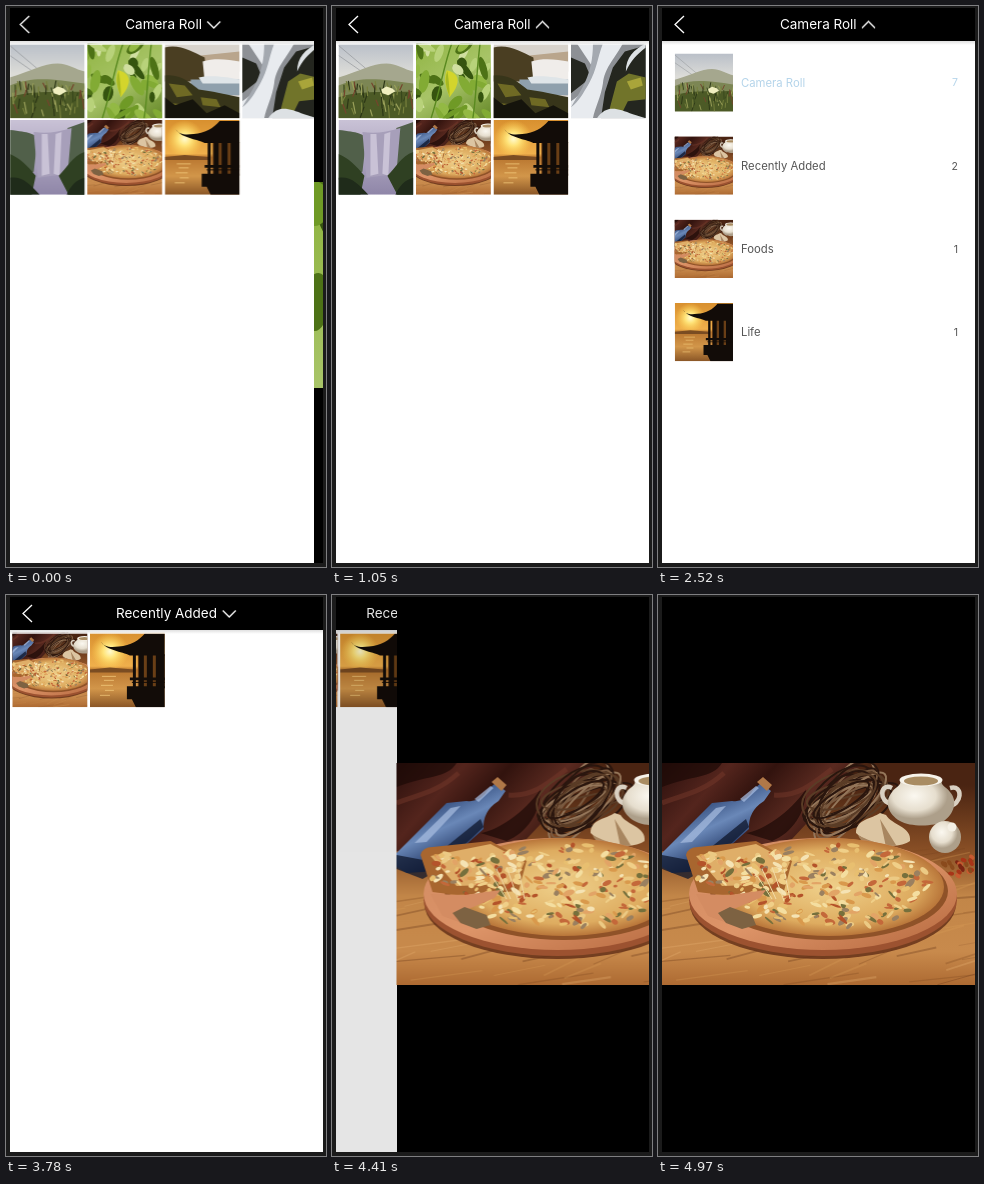
Write an HTML page that moves like this. It is 320 px wide and 561 px high and loops after 5.04 s.

```html
<!DOCTYPE html>
<html lang="en">
<head>
<meta charset="utf-8">
<title>Photo picker</title>
<style>
html, body { margin: 0; width: 100%; height: 100%; overflow: hidden; background: #1b1b1b; }
svg { display: block; }
text { font-family: Inter, Roboto, sans-serif; }
.title { font-size: 13.5px; fill: #fff; text-anchor: middle; }
.row { font-size: 11.3px; fill: #555; }
.count { font-size: 10.5px; text-anchor: end; }
.on { fill: #b4d4ea; }
.line { fill: none; stroke: #fff; stroke-width: 1.3; }

#page, #detail, #dim, #list, #arrow, #shift, #fresh, .early, .late { animation: 5040ms ease-in-out infinite; }
#page { animation-name: page; }
#detail { animation-name: detail; }
#dim { animation-name: dim; }
#list { animation-name: list; }
#fresh { animation-name: fresh; }
#arrow { animation-name: arrow; transform-box: fill-box; transform-origin: center; }
#shift { animation-name: shift; animation-timing-function: step-end; }
.early { animation-name: early; animation-timing-function: step-end; }
.late { opacity: 0; animation-name: late; animation-timing-function: step-end; }

@keyframes page {
  0% { transform: translateX(-2.7px); }
  1.38%, 78.94% { transform: translateX(0); }
  91.25%, 100% { transform: translateX(-94px); }
}
@keyframes detail {
  0% { transform: translateX(304px); }
  1.38%, 78.94% { transform: translateX(313px); }
  91.25%, 100% { transform: translateX(0); }
}
@keyframes dim {
  0%, 78.94% { opacity: 0; }
  91.25%, 100% { opacity: .13; }
}
@keyframes list {
  0%, 21.6% { transform: translateY(-522px); }
  29.8%, 52.2% { transform: translateY(0); }
  57%, 100% { transform: translateY(-522px); }
}
@keyframes arrow {
  0%, 17.2% { transform: rotate(0); }
  20.7%, 52.2% { transform: rotate(180deg); }
  57%, 100% { transform: rotate(360deg); }
}
@keyframes fresh {
  0%, 61.9% { opacity: 0; }
  67.5%, 100% { opacity: 1; }
}
@keyframes shift { 0% { transform: none; } 52.5%, 100% { transform: translateX(12.7px); } }
@keyframes early { 0% { opacity: 1; } 52.5%, 100% { opacity: 0; } }
@keyframes late { 0% { opacity: 0; } 52.5%, 100% { opacity: 1; } }
</style>
</head>
<body>
<svg width="100%" height="100%" viewBox="0 0 320 561">
  <defs>
    <linearGradient id="wood" x2="0" y2="1">
      <stop offset=".1" stop-color="#4a2412"/><stop offset=".4" stop-color="#8a5026"/>
      <stop offset=".6" stop-color="#c28648"/><stop offset=".85" stop-color="#c88a4c"/><stop offset="1" stop-color="#ad6a32"/>
    </linearGradient>
    <linearGradient id="cloth" x2="1" y2=".4">
      <stop offset="0" stop-color="#2a0f0c"/><stop offset=".3" stop-color="#54251d"/><stop offset=".5" stop-color="#32130e"/>
      <stop offset=".75" stop-color="#5a2a20"/><stop offset="1" stop-color="#2c110c"/>
    </linearGradient>
    <linearGradient id="glass" x1=".3" y1=".2" x2=".7" y2=".9">
      <stop offset="0" stop-color="#2a4272"/><stop offset=".4" stop-color="#6a88b8"/><stop offset=".75" stop-color="#2c4270"/><stop offset="1" stop-color="#121a30"/>
    </linearGradient>
    <linearGradient id="clay" x2="1" y2="1">
      <stop offset="0" stop-color="#d08a62"/><stop offset=".5" stop-color="#dd9468"/><stop offset="1" stop-color="#b5683e"/>
    </linearGradient>
    <radialGradient id="cheese">
      <stop offset="0" stop-color="#efd08a"/><stop offset=".75" stop-color="#deac60"/><stop offset="1" stop-color="#b9763a"/>
    </radialGradient>
    <radialGradient id="china" cx=".4" cy=".35">
      <stop offset="0" stop-color="#fbf8f0"/><stop offset=".65" stop-color="#e6dece"/><stop offset="1" stop-color="#ad9f8a"/>
    </radialGradient>
    <linearGradient id="dusk" x2="0" y2="1">
      <stop offset="0" stop-color="#d8902f"/><stop offset=".45" stop-color="#f0b04c"/>
      <stop offset=".5" stop-color="#b9762f"/><stop offset=".75" stop-color="#d2964a"/><stop offset="1" stop-color="#8a5626"/>
    </linearGradient>
    <radialGradient id="sun"><stop offset="0" stop-color="#fffbd0"/><stop offset=".35" stop-color="#ffe47a"/><stop offset="1" stop-color="#ffd050" stop-opacity="0"/></radialGradient>
    <linearGradient id="haze" x2="0" y2="1"><stop offset="0" stop-color="#b9bfc8"/><stop offset=".4" stop-color="#dcdcd8"/></linearGradient>
    <linearGradient id="mist" x2="0" y2="1"><stop offset="0" stop-color="#c9c2d6"/><stop offset="1" stop-color="#8f86a8"/></linearGradient>
    <linearGradient id="leafy" x2="1" y2="1"><stop offset="0" stop-color="#8cb23c"/><stop offset=".5" stop-color="#a8c468"/><stop offset="1" stop-color="#587c1c"/></linearGradient>
    <linearGradient id="edge" x2="0" y2="1"><stop offset="0" stop-color="#d2d2d2"/><stop offset="1" stop-color="#fff"/></linearGradient>

    <symbol id="pizza" viewBox="0 0 313 222" preserveAspectRatio="xMidYMid slice">
      <path fill="url(#wood)" d="M0 0h313v222H0z"/>
      <g id="grain" fill="none" stroke-opacity=".3"/>
      <path fill="url(#cloth)" d="M0 0h200l-25 28-45 48-60 14L0 88z"/>
      <path fill="#1c0907" opacity=".7" d="M0 0h60C50 16 30 12 0 24zM84 70c16-2 44-20 60-44 0 24-14 44-34 52z"/>
      <path fill="none" stroke="#74382b" stroke-opacity=".5" stroke-width="5" d="M0 40c20-8 40-10 62-30M112 32c24 2 40-12 58-26"/>
      <g id="twigs" fill="none" stroke-width="2"/>
      <path fill="url(#glass)" d="M0 90 50 40l20-2q14 2 22-12l7-6 10 8-7 10q-16 10-15 28l-47 42-30 2-10-6z"/>
      <path fill="#0f172c" opacity=".75" d="M0 92l32 6 52-42 3 8-47 44-14 8-26-10z"/>
      <path fill="#a4bade" opacity=".75" d="M18 80 54 45l10-2-34 36zM78 36l16-13 3 2-15 14z"/>
      <path fill="#b07848" d="M95 19l6-5 9 8-5 6z"/>
      <path fill="none" stroke="#d9d0c2" stroke-width="4.500" d="M230 25c-12-6-14 14 0 16M288 25c14-4 12 18-2 18"/>
      <path fill="url(#china)" d="M238 17c2 6-4 6-8 12-8 10-4 22 8 29 10 6 34 6 44 0 10-7 14-20 6-29-4-6-10-6-8-12z"/>
      <ellipse cx="259" cy="17" rx="21.500" ry="6.500" fill="#f7f3ea"/>
      <ellipse cx="259" cy="18" rx="17" ry="4.500" fill="#a98c62"/>
      <path fill="#dcc5a2" d="M194 70c0-14 16-14 24-20l6 2c6 10 26 12 24 26-10 8-40 6-54-8z"/>
      <path fill="#a88660" d="M218 56l6 28 10-2zM196 72c16 8 20 8 30 10-14 2-26 0-30-10z"/>
      <circle cx="283" cy="74" r="16" fill="url(#china)"/>
      <circle cx="290" cy="64" r="4.500" fill="#f4efe4"/>
      <g id="spice"/>
      <ellipse cx="161" cy="141" rx="133" ry="55" fill="#5f2c16" opacity=".8"/>
      <ellipse cx="161" cy="137" rx="134" ry="56" fill="#9c5230"/>
      <ellipse cx="161" cy="131" rx="134" ry="56" fill="url(#clay)"/>
      <ellipse cx="167" cy="128" rx="119" ry="49" fill="#8f5228"/>
      <ellipse cx="167" cy="124" rx="115" ry="49" fill="url(#cheese)"/>
      <path fill="#a8662f" d="M24 92q2-8 12-8l58-6 36 20-8 30-62 4-24-3z"/>
      <path fill="#dfae68" d="M34 93l60-12 34 18-10 22-58 2z"/>
      <g id="toppings"/>
      <path fill="#d48c62" d="M34 131l34 1 36-5-6 8-38 16 8 10-22-8z"/>
      <path fill="#7d6242" d="M56 150l12-6 22 8 4 10-14 4-16-6z"/>
      <path stroke="#f3dca8" fill="none" d="M92 108l18 28M100 106l14 30M110 104l12 34M122 106l6 30"/>
    </symbol>

    <symbol id="leaves" viewBox="0 0 313 206" preserveAspectRatio="xMidYMid slice">
      <path fill="url(#leafy)" d="M0 0h313v206H0z"/>
      <g id="foliage"/>
      <path fill="none" stroke="#5a8a20" stroke-width="4" d="M95 206C120 130 130 60 152 0M210 206c10-60 8-110 20-206"/>
      <path fill="#d3d52c" d="M138 74c24 4 36 22 28 40-4 14-12 22-20 34-8-24-18-46-8-74z"/>
      <path fill="#a5b822" d="M140 76c4 24 6 50 6 70-8-20-16-44-6-70z"/>
    </symbol>

    <symbol id="meadow" viewBox="0 0 75 75">
      <path fill="url(#haze)" d="M0 0h75v75H0z"/>
      <path stroke="#8a8e92" stroke-width=".6" d="M0 2 38 34M0 12l26 18"/>
      <path fill="#a5a78e" d="M0 34c20-6 34-14 48-14 10 0 18 6 27 8v47H0z"/>
      <path fill="#7c8654" d="M0 42c24-10 44-6 75-2v35H0z"/>
      <path fill="#4c5a26" d="M0 54c24-8 50-4 75-6v27H0z"/>
      <g id="grass" stroke-width="1.200" fill="none"/>
      <path fill="#f0efc0" d="M43 46l5-3 6 2 3 3-7 4-6-2z"/>
    </symbol>

    <symbol id="cliff" viewBox="0 0 75 75">
      <path fill="#d8d3cc" d="M0 0h75v75H0z"/>
      <path fill="#b9a58c" d="M36 12 75 8v20H36z"/>
      <path fill="#4a3e22" d="M0 4c14-4 28 4 40 10l2 24H0z"/>
      <path fill="#f0edea" d="M38 18c12-4 26-2 37 0v20H40z"/>
      <path fill="#8fa0ac" d="M26 36h49v16H26z"/>
      <path fill="#dfe5e8" d="M34 34c12-3 30 0 41 2v4L38 40z"/>
      <path fill="#37351a" d="M0 32c16-2 26 8 34 14 14 2 24 4 41 8v21H0z"/>
      <path fill="#6f6a24" d="M4 40l16 2 8 10-16 2zM36 54l16 2 4 8-18-2zM8 60l18 2-4 8z"/>
      <path fill="#15140c" d="M0 54l10 8 18-6 14 14 18-8 15 8v5H0z"/>
    </symbol>

    <symbol id="rapids" viewBox="0 0 75 75">
      <path fill="#8d9095" d="M0 0h75v75H0z"/>
      <path fill="#24261f" d="M42 24 54 8l21-6v73H30l4-26zM0 14l14 6 6 14-20 16z"/>
      <path fill="#71742a" d="M46 38l12-8 17 4v22l-18 2-6 12-14 2z"/>
      <path fill="#a9a53a" d="M56 38l14-4 2 8-12 4z"/>
      <path fill="#e8ebef" d="M6 0h46c-10 18-18 24-20 40-2 14-8 24-10 35H0V58c12-8 20-20 22-34z"/>
      <path fill="#a4a9b0" d="M22 0h10c-6 16-6 26-14 40-6 10-10 18-18 24 10-18 22-32 22-64z"/>
      <path fill="#dde1e4" d="M75 4c-10 8-14 12-20 24 0-14 8-22 20-28zM26 75c10-14 20-10 36-4l13 4z"/>
    </symbol>

    <symbol id="falls" viewBox="0 0 75 75">
      <path fill="url(#mist)" d="M0 0h75v75H0z"/>
      <path fill="#51604a" d="M0 10c20 2 24 4 28 8l-4 34L0 60zM58 8l17-6v73H58z"/>
      <path fill="#a79fba" d="M24 12c14 2 24 0 38-4l-4 46-30 4z"/>
      <path fill="#c9c2d6" d="M32 14l6 0 2 40-8 2zM46 14l6-2-2 44-6-2z"/>
      <path fill="#2f4022" d="M0 34c10 4 18 12 26 22l-4 19H0zM75 32c-12 4-18 16-26 24l10 19h16z"/>
      <path fill="#1f2b1a" d="M0 58c12-2 20 6 30 17H0zM75 58c-8 2-14 8-18 17h18z"/>
    </symbol>

    <symbol id="pavilion" viewBox="0 0 75 75">
      <path fill="url(#dusk)" d="M0 0h75v75H0z"/>
      <circle cx="20" cy="19" r="19" fill="url(#sun)"/>
      <path fill="#7a4c22" d="M0 37l20-2 24 2v3H0z"/>
      <path stroke="#f6cf80" stroke-opacity=".7" d="M12 44h14M14 48h10M11 53h12M15 58h9M10 63h10"/>
      <path fill="#6a3f16" d="M48 22h27v34H48z"/>
      <g fill="#120c08">
        <path d="M11 9c3 6 10 6 18 5 12-1 20-6 26-13h20v22H40c-8-4-24-5-29-14z"/>
        <path d="M43 22h3v34h-3zM49 22h5v34h-5zM57 22h6v34h-6zM66 22h9v34h-9z"/>
        <path d="M40 45h35v3H40zM37 54h38v21H46l-4-8h-5z"/>
      </g>
      <path stroke="#120c08" d="M42 50h33"/>
    </symbol>
  </defs>

  <path fill="#1b1b1b" d="M0 0h320v561H0z"/>
  <svg x="4" y="2" width="313" height="555" viewBox="4 2 313 555">
    <path d="M4 2h313v555H4z"/>
    <g id="page">
      <path fill="#fff" d="M4 35h313v522H4z"/>
      <g class="early" id="roll"></g>
      <g id="fresh"></g>
      <g id="list"><path fill="#fff" d="M4 35h313v522H4z"/></g>
      <path fill="url(#edge)" d="M4 35h313v4H4z" opacity=".7"/>
      <path d="M4 2h313v33H4z"/>
      <path class="line" d="M26 10l-9 8.500 9 8.500"/>
      <text class="title early" x="160.300" y="23.400">Camera Roll</text>
      <text class="title late" x="160.500" y="23.400">Recently Added</text>
      <g id="shift"><path id="arrow" class="line" d="M204 15.500l6.500 6.500 6.500-6.500"/></g>
    </g>
    <path id="dim" d="M4 2h313v555H4z"/>
    <g id="detail">
      <path d="M4 2h313v555H4z"/>
      <use class="early" href="#leaves" x="4" y="176" width="313" height="206"/>
      <use class="late" href="#pizza" x="4" y="168" width="313" height="222"/>
    </g>
  </svg>
</svg>
<script>
const STEP = 70, LOOP = 5040;
const $ = id => document.getElementById(id);
let seed = 11;
const rnd = () => (seed = seed * 16807 % 2147483647) / 2147483647;
const span = (a, b) => a + (b - a) * rnd();
const pick = s => s.split(' ')[Math.floor(rnd() * s.split(' ').length)];
const fill = (id, n, draw) => $(id).innerHTML = Array.from({ length: n }, draw).join('');
const blob = (x, y, rx, ry, turn, color) =>
  `<ellipse rx="${rx}" ry="${ry}" fill="${color}" transform="translate(${x} ${y}) rotate(${turn})"/>`;

fill('grain', 60, () => `<path d="M${span(-40, 300)} ${span(95, 222)}l${span(30, 90)} ${-span(6, 18)}"
  stroke="${pick('#7a4520 #e6b476 #5c3016 #d89c58')}" stroke-width="${span(.6, 2.2)}"/>`);
fill('twigs', 24, () => `<ellipse rx="${span(28, 50)}" ry="${span(6, 26)}" stroke="${pick('#7a5a40 #5a3c26 #94765a #2a160e')}"
  transform="translate(${span(178, 192)} ${span(32, 42)}) rotate(${span(-60, -10)})"/>`);
fill('spice', 22, () => blob(span(278, 312), span(94, 114), 3, 2, span(0, 90), pick('#a83418 #7c2412 #c85a30 #8a4a1c')));
fill('toppings', 300, (_, i) => {
  const a = span(0, 6.283), r = Math.sqrt(rnd()), left = i % 6 === 0;
  const x = left ? span(36, 118) : 167 + 106 * r * Math.cos(a);
  const y = left ? span(89, 122) : 123 + 43 * r * Math.sin(a);
  return blob(x, y, span(2, 6.5), span(1, 3), span(-50, 50),
    pick('#f4dea0 #f5e3b4 #e8bf70 #c4683a #b4532a #e2a466 #9a8060 #f0cf88 #76703c #ecca84 #d9994c'));
});
fill('foliage', 60, () => blob(span(0, 313), span(0, 206), span(14, 34), span(6, 14), span(20, 150),
  pick('#6f9a26 #93b944 #b8d27a #4d7216 #d0dfa0 #82ab34 #35540f')));
fill('grass', 60, () => {
  const x = span(0, 75), y = span(46, 75);
  return `<path d="M${x} ${y}l${span(-4, 4)} ${-span(6, 14)}" stroke="${pick('#77803c #38471c #9aa05a #75442c #2c3616')}"/>`;
});

const photo = (id, x, y, size) => `<use href="#${id}" x="${x}" y="${y}" width="${size}" height="${size}"/>`;
const grid = names => names.split(' ').map((id, i) =>
  photo(id, 6.5 + i % 4 * 77.5, 37.5 + Math.floor(i / 4) * 76.5, 74.8)).join('');
$('roll').innerHTML = grid('meadow leaves cliff rapids falls pizza pavilion');
$('fresh').innerHTML = grid('pizza pavilion');

const albums = [['meadow', 'Camera Roll', 7], ['pizza', 'Recently Added', 2], ['pizza', 'Foods', 1], ['pavilion', 'Life', 1]];
$('list').innerHTML += albums.map(([id, name, count], i) => {
  const y = 47.4 + i * 83.2, on = i ? '' : ' on';
  return photo(id, 16.8, y, 58.2) +
    `<text class="row${on}" x="83" y="${y + 33.4}">${name}</text>` +
    `<text class="row count${on}" x="300" y="${y + 33}">${count}</text>`;
}).join('');

// Advance the keyframes in even steps, like a screen recording.
const motions = document.getAnimations();
motions.forEach(m => m.pause());
let start;
function tick(now) {
  start ??= now;
  const t = Math.floor((now - start) / STEP) * STEP % LOOP;
  motions.forEach(m => m.currentTime = t);
  requestAnimationFrame(tick);
}
requestAnimationFrame(tick);
</script>
</body>
</html>
```
